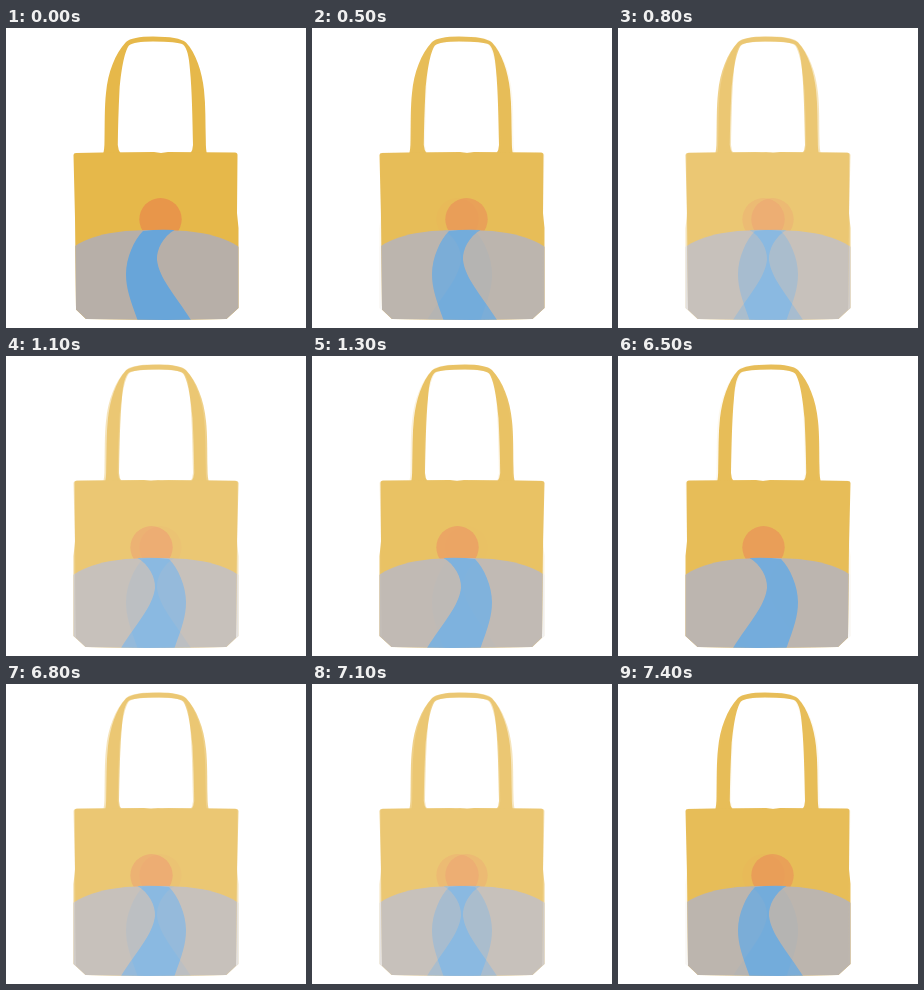
An HTML page that plays this animation: 300x300 px, repeating every 7500 ms.

```html
<!DOCTYPE html>
<html lang="en">
<head>
<meta charset="utf-8">
<title>Tote bag</title>
<style>
html, body { margin: 0; width: 100%; height: 100%; overflow: hidden; background: #fff; }
svg { display: block; width: 100vw; height: 100vh; }
</style>
</head>
<body>
<svg viewBox="0 0 300 300">
  <defs>
    <path id="body" d="M67.500 127 Q67.500 125 70 125 L96 124.500 L148 124 L155 125 L162 124 L229 124.500 Q231.500 124.500 231.500 127 L231 185 L232.500 200 L232.500 280 L220.500 291 L160 292 L80 291 L70 281.500 L69 190 Z"/>
    <clipPath id="cut"><use href="#body"/></clipPath>
    <g id="bag">
      <g fill="#e6b84a">
        <path d="M97 126 Q98.500 122 98.500 112 C98.800 95 98.500 78 100 65 C102 44 109 26 120 14 Q126 8.500 147 8.500 Q173 8.500 180 14.500 C190 25 196 44 198 62 C199.800 78 199.300 95 199.800 112 Q199.800 122 201 126 H184 Q187 122 187 117 C186.500 92 186 62 184 42 C183 28 181 20 177 16.500 Q171 13.500 147 13.500 Q128 13.500 123 17.500 C118 24 115 44 113.500 62 C112.500 82 112 100 111.800 117 Q112 122 115 126 Z"/>
        <use href="#body"/>
      </g>
      <g clip-path="url(#cut)">
        <circle cx="154.500" cy="191.300" r="21.200" fill="#e8964a"/>
        <path d="M60 224 L69 218 C92 203 125 202 150 202 C175 202 208 203 231.500 218 L240 224 V295 H60 Z" fill="#b7afa8"/>
        <path d="M137 203 Q152 201 168.500 202 C157 209 150.500 221 151 232 C153.500 251 168 265 185 292 H131.500 C124 271 120 260 120 246 C120 230 128 212 137 203 Z" fill="#68a5d9"/>
      </g>
    </g>
  </defs>
  <use id="first" href="#bag"/>
  <use id="second" href="#bag" transform="matrix(-1 0 0 1 300 0)" opacity="0"/>
</svg>
<script>
const LOOP = 7500, STEP = 100, STEPS = 11;
const first = document.getElementById('first');
const second = document.getElementById('second');
const start = performance.now();

// Fade steps passed since a given time, from 0 to STEPS
const steps = (t, from) => Math.max(0, Math.min(STEPS, Math.floor((t - from) / STEP)));

function draw(now) {
  const t = Math.max(0, now - start) % LOOP;
  const mix = (steps(t, 400) - steps(t, 6400)) / STEPS;
  first.setAttribute('opacity', 1 - mix);
  second.setAttribute('opacity', mix);
  requestAnimationFrame(draw);
}
requestAnimationFrame(draw);
</script>
</body>
</html>
```
